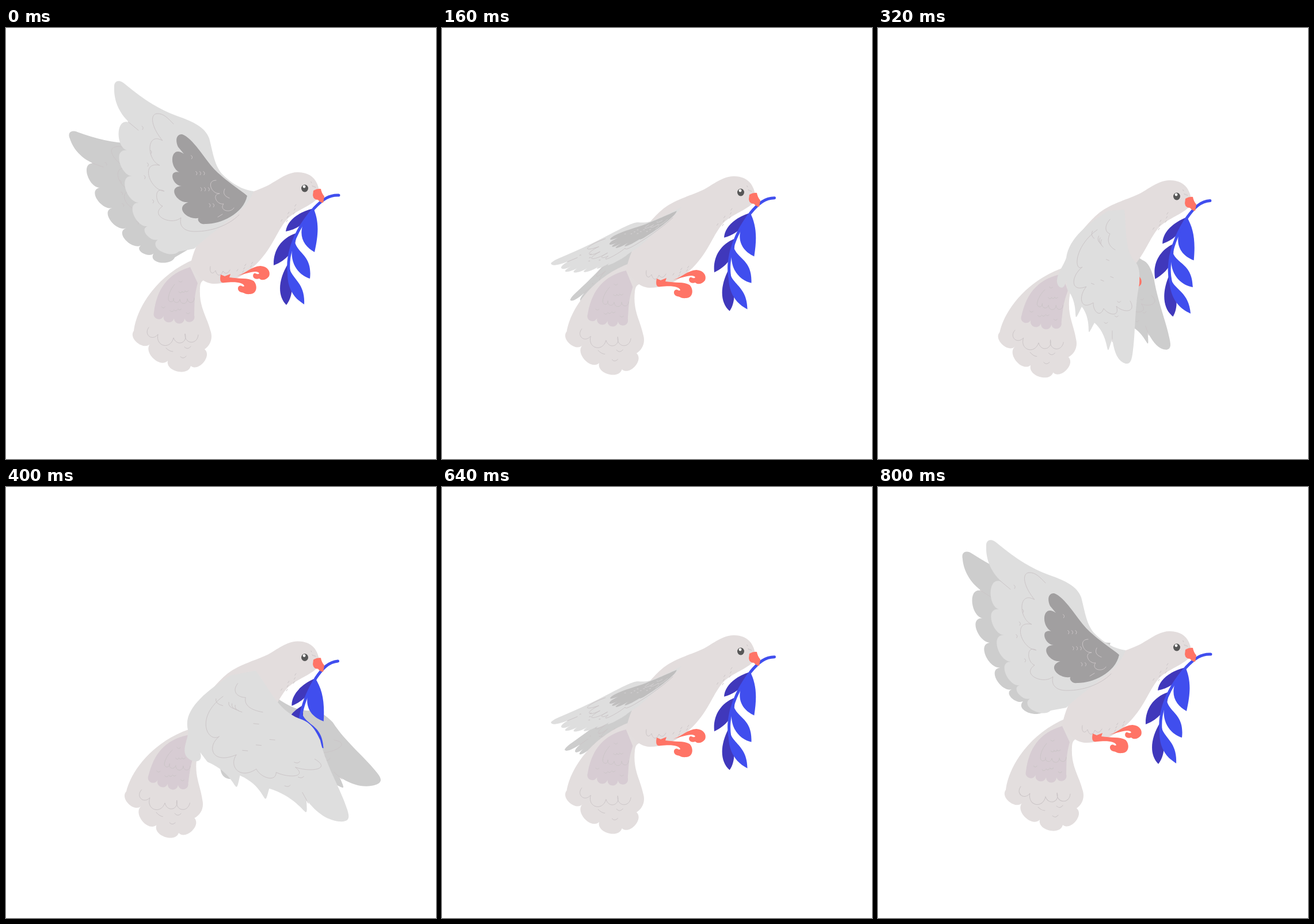
An HTML page that plays this animation: 747x750 px, repeating every 0.84 s.

```html
<!DOCTYPE html>
<html>
<head>
<meta charset="utf-8">
<style>
  html, body { margin: 0; width: 100%; height: 100%; overflow: hidden; background: #fff }
  svg { display: block; width: 100vw; height: 100vh }
  .line { fill: none; stroke: #cbc5c7; stroke-width: 1; stroke-linecap: round; vector-effect: non-scaling-stroke }
</style>
</head>
<body>
<svg id="stage" viewBox="0 0 747 750"></svg>
<script>
const LOOP = 840, STEP = 40, DOWN = 400;
const { sin, cos, sqrt, floor, max, PI } = Math;
const $ = id => document.getElementById(id);

// Rounded lobes from point to point, bulging to the left of travel.
// Positive lean pushes the lobe tips forwards, negative backwards.
function lobes(depth, lean, ...points) {
  return points.slice(1).map(([x, y], i) => {
    const [px, py] = points[i], dx = x - px, dy = y - py;
    const w1 = depth, w2 = depth * (1 + lean);
    return `C${px + lean / 2 * dx + w1 * dy} ${py + lean / 2 * dy - w1 * dx} ` +
      `${x + lean * dx + w2 * dy} ${y + lean * dy - w2 * dx} ${x} ${y}`;
  }).join('');
}

// Small marks scattered along a line.
function specks(count, [x1, y1], [x2, y2], spread, mark) {
  return Array.from({ length: count }, (_, i) => {
    const f = (i + .5) / count, side = ((i * .618 + .3) % 1 - .5) * spread;
    return `M${x1 + f * (x2 - x1) + side} ${y1 + f * (y2 - y1) + side}${mark}`;
  }).join('');
}

const shape = (fill, d) => `<path fill="${fill}" d="${d}"/>`;
const line = d => `<path class="line" d="${d}"/>`;
const group = (id, ...parts) => `<g id="${id}">${parts.join('')}</g>`;
const DOT = 'l2-3', CURL = 'q4 2 1 6', DIP = 'q3 4 6 0';

const front = group('front',
  `<path d="M327 384L300 389${lobes(.44, .2, [300, 389], [264, 368], [246, 345], [231, 304], [220, 258], [210, 213], [215, 165])}
    C200 152 187 130 188 104C187 91 197 89 206 97C236 122 262 140 297 153C326 163 346 173 353 192
    C361 222 362 245 384 262C400 276 418 283 430 284C420 318 372 342 327 384Z"/>`,
  line(`M405 325C385 345 355 354 330 354C310 355 300 345 304 330
    ${lobes(.55, .3, [304, 330], [272, 310], [275, 284], [267, 239], [272, 196])}C252 172 250 150 262 149C274 148 282 158 291 167`),
  line('M212 163L230 178' + specks(5, [239, 160], [250, 308], 20, CURL)));

const back = group('back',
  `<path d="M428 316C432 350 428 385 445 405C454 413 455 425 454 445C446 485 447 530 443 560C441 580 438 585 430 584
    C417 580 410 565 407 540${lobes(1.1, -1, [407, 540], [376, 513], [354, 485], [329, 455])}
    L327 438C325 453 318 455 313 448C305 435 322 415 327 400C332 365 365 340 400 318Z"/>`,
  line(`M438 475${lobes(.9, -.3, [438, 475], [414, 484], [392, 488], [374, 478], [362, 450], [355, 416])}
    C340 425 340 380 381 351M407 527V546M403 333C392 345 395 356 403 358C397 370 401 380 412 386`),
  line(specks(4, [374, 355], [392, 370], 18, 'q-4 8 3 13') + specks(4, [405, 400], [375, 460], 24, 'l5 2') +
    specks(3, [425, 470], [386, 520], 14, DIP)));

const patch = group('patch',
  shape('#a19fa0', `M419 292C412 325 370 342 345 341
    ${lobes(.62, .3, [345, 341], [339, 329], [317, 303], [305, 275], [301, 251], [309, 219])}
    L299 207C293 194 297 184 306 185C324 191 344 226 362 246C384 268 409 283 419 292Z`),
  line('M396 313' + lobes(.6, .2, [396, 313], [378, 306], [371, 288], [365, 265]) + 'M380 280c-4 8 0 13 8 16M368 329l8-5'),
  line(specks(9, [325, 222], [362, 318], 28, CURL)));

const tail = group('tail',
  shape('#e3dede', `M328 402L350 436C338 440 338 444 337 452C335 485 348 500 355 526C360 540 355 552 345 559
    ${lobes(.47, 0, [345, 559], [321, 588], [281, 579], [251, 549], [222, 527])}C226 490 260 430 328 402Z`),
  shape('#d7ccd3', `M320 416L333 444C326 470 328 480 327 500
    ${lobes(.7, 0, [327, 500], [310, 505], [292, 505], [274, 500], [257, 495])}C262 455 280 428 320 416Z`),
  line('M334 534' + lobes(.8, 0, [334, 534], [311, 532], [291, 539], [264, 533], [248, 521])),
  line('M327 470' + lobes(.8, 0, [327, 470], [315, 471], [302, 472], [291, 470], [282, 472]) + 'C282 462 288 452 293 446'),
  line('M278 557q6 6 12 6M310 555q6 6 11-1M303 572q5 5 10-1' +
    specks(4, [303, 440], [306, 468], 16, DIP) + specks(5, [267, 486], [316, 494], 8, DIP)));

const body = group('body',
  shape('#e3dddd', `M506 251C530 251 543 264 545 290C540 306 506 316 491 330C474 347 466 374 447 397
    C428 422 395 446 360 445C343 444 333 432 320 415C325 385 345 340 385 307C408 290 435 284 455 274C470 266 488 251 506 251Z`),
  line('M355 415c-2 10 3 16 9 7c2 9 8 12 13 1c4 6 8 5 12-2'),
  line(specks(7, [477, 340], [508, 312], 8, DOT) + specks(6, [400, 426], [430, 410], 8, DOT) +
    specks(6, [531, 268], [538, 284], 9, 'l1 2')),
  shape('#ff7466', `M402 431C418 426 426 415 442 414C455 415 460 424 457 432C452 439 444 440 440 436
    C432 439 427 433 430 428C433 424 436 431 440 427C436 420 420 427 402 431Z`),
  shape('#ff7466', `M373 429L380 432L390 428L388 434C405 437 420 434 430 440C438 448 436 463 424 463
    C415 464 413 460 409 460C403 459 401 452 405 449C409 446 411 452 414 449C412 443 400 441 380 443C372 445 371 438 373 429Z`),
  '<ellipse cx="519" cy="279" rx="6" ry="6.5" fill="#575757"/><circle cx="518" cy="276" r="2.4" fill="#fff"/>');

const branch = group('branch',
  shape('#4038bb', `M534 314C505 321 488 337 486 354C507 350 525 337 534 314ZM504 357C477 366 464 388 465 413
    C488 404 505 386 504 357ZM490 410C473 438 471 466 487 482C501 465 499 434 490 410Z`),
  shape('#404eee', `M534 313C543 335 544 355 536 390C512 377 501 350 534 313ZM501 366C502 393 533 392 528 436
    C508 430 487 407 501 366ZM490 410C494 438 520 440 518 481C497 468 485 448 490 410Z`),
  `<path fill="none" stroke="#404eee" stroke-width="5" stroke-linecap="round"
    d="M578 291C562 290 550 298 535 314C515 338 505 355 497 378C492 395 490 405 491 422"/>`);

const beak = group('beak', shape('#ff7466', 'M534 283Q541 279 547 280Q548 287 553 293L551 304Q546 304 542 299Q534 299 533 291Z'));

$('stage').innerHTML = `<defs>${front}${back}${patch}</defs><g id="far" fill="#cdcdcd"></g>
  ${tail}${body}${branch}${beak}<g id="near" fill="#dedede"></g>`;

// Frame of the wing: root, with axes to the tip and the last feather; s runs 0 (up) to 1 (down).
function flap(s) {
  const spread = cos(PI * s) ** 4;
  const polar = (r, deg) => [r * cos(deg * PI / 180), r * sin(deg * PI / 180)];
  return new DOMMatrix([
    ...polar(231 + 67 * spread, 221 - 163 * s + 3 * sin(2 * PI * s)),
    ...polar(150 + 32 * spread, 150 - 22 * s),
    420 - 12 * sin(PI * s), 292 + 50 * s + 6 * sin(PI * s)
  ]);
}
const fromFront = flap(0).inverse(), fromBack = flap(.8).inverse();

function drawWing(id, m, patchOpacity) {
  const use = (name, rest, opacity = 1) =>
    `<use href="#${name}" transform="${m.multiply(rest)}" opacity="${opacity}"/>`;
  const isBack = m.a * m.d > m.b * m.c;
  $(id).innerHTML = (isBack ? use('back', fromBack) : use('front', fromFront)) +
    (patchOpacity > 0 ? use('patch', fromFront, patchOpacity) : '');
}

function draw(now) {
  const t = floor(now % LOOP / STEP) * STEP;
  const s = 1 - Math.abs(t - DOWN) / DOWN, rise = max(0, t / DOWN - 1);
  const drop = `translate(0 ${17.5 * s})`;
  const place = (id, turn = '') => $(id).setAttribute('transform', drop + turn);
  place('body');
  place('beak');
  place('tail', `rotate(${6.8 * s} 340 410)`);
  place('branch', `rotate(${-9.7 * s} 545 297)`);

  // The far wing runs ahead of the near one and falls into line as they rise.
  const near = flap(s);
  const far = new DOMMatrix()
    .translate(near.e - 55 + 66 * s + 30 * rise, near.f - 12 + 35 * sqrt(s))
    .rotate(13 * rise - 20).scale(.9 + .08 * rise)
    .translate(-near.e, -near.f).multiply(near);
  drawWing('far', far, 0);
  drawWing('near', near, 1 - s / .8);
}

const start = performance.now();
function tick() {
  draw(performance.now() - start);
  requestAnimationFrame(tick);
}
tick();
</script>
</body>
</html>
```
